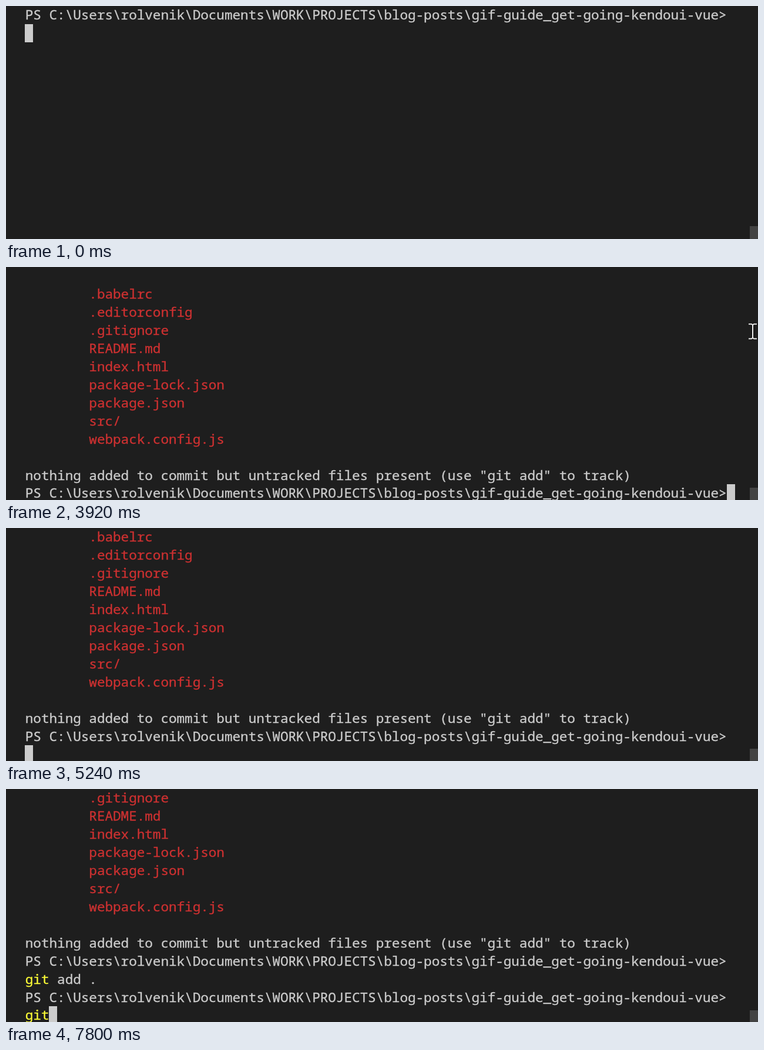
Write an HTML page that moves like this. It is 1280 px wide and 398 px high and loops after 8000 ms.

```html
<!DOCTYPE html>
<html lang="en">
<head>
<meta charset="utf-8">
<title>Terminal session</title>
<style>
  html, body { margin: 0; width: 100%; height: 100%; overflow: hidden; background: #1e1e1e; }
  main { position: fixed; inset: 0; overflow: hidden; contain: strict; }
  pre, #caret, #slider, #mouse { position: absolute; }
  pre {
    left: 32.8px; top: .4px; margin: 0; color: #ccc;
    font: 22.625px/30.92px "Noto Sans Mono", monospace;
    font-variant-ligatures: none;
    -webkit-text-stroke: .35px;
  }
  .cmd { color: #fafa36; }
  .new { color: #cd3131; }
  #caret { width: 13.6px; height: 31px; background: #ccc; }
  #slider { left: 1266px; width: 14px; height: 25px; background: #434343; }
  #mouse { left: 0; top: 0; overflow: visible; }
</style>
</head>
<body>
<main>
  <pre id="text"></pre>
  <div id="caret"></div>
  <div id="slider"></div>
  <svg id="mouse" width="1" height="1" fill="none">
    <path d="M-7-12.5h5l2 1.5 2-1.5h5M0-11v22M-7 12.5h5l2-1.5 2 1.5h5" stroke="#111" stroke-width="4"/>
    <path d="M-7-12.5h5l2 1.5 2-1.5h5M0-11v22M-7 12.5h5l2-1.5 2 1.5h5" stroke="#eee" stroke-width="2"/>
  </svg>
</main>
<script>
const LOOP = 8000, LEFT = 32.4, CELL = 13.575, ROW = 30.92, ROWS = 13;
const $ = id => document.getElementById(id);

const prompt = String.raw`PS C:\Users\rolvenik\Documents\WORK\PROJECTS\blog-posts\gif-guide_get-going-kendoui-vue>`;
const files = ['.babelrc', '.editorconfig', '.gitignore', 'README.md', 'index.html',
  'package-lock.json', 'package.json', 'src/', 'webpack.config.js'];
const lines = [
  prompt, 'git init',
  'Initialized empty Git repository in C:/Users/rolvenik/Documents/WORK/PROJECTS/blog-posts/',
  'gif-guide_get-going-kendoui-vue/.git/',
  prompt, ' git status',
  'On branch master', '', 'No commits yet', '',
  'Untracked files:', '  (use "git add <file>..." to include in what will be committed)', '',
  ...files.map(f => ' '.repeat(8) + f), '',
  'nothing added to commit but untracked files present (use "git add" to track)',
  prompt, 'git add .', prompt, 'git'
];

// Each step places the caret; everything before the caret is on screen.
const steps = [];
const at = (time, line, col, top = Math.max(0, line - ROWS + 1), mouse = null) =>
  steps.push({ time, line, col, top, mouse });
const type = (line, col, ...times) => times.forEach(t => at(t, line, ++col));
const scroll = (time, top, x, y) => at(time, 25, 0, top, x && [x, y]);

at(0, 1, 0);
type(1, 0, 320, 390, 460, 540, 710, 790, 860, 940);
at(1170, 2, 0);
at(1320, 4, prompt.length);
at(1700, 5, 0);
type(5, 0, 1870, 2570, 2650, 2730, 2880, 2960, 3130, 3210, 3360, 3530, 3680);
at(3850, 6, 0);
at(3920, 24, prompt.length, 12, [1271, 110]);
scroll(3990, 13, 1258, 124);
scroll(4080, 13, 1248, 136);
scroll(4220, 11, 1243, 142);
scroll(4300, 9, 1243, 142);
scroll(4380, 7, 1243, 142);
scroll(4460, 5, 1243, 142);
scroll(4690, 6, 1243, 142);
scroll(4770, 8, 1243, 142);
scroll(4860, 9, 1243, 142);
scroll(4930, 10, 1243, 142);
scroll(5010, 11, 1243, 142);
scroll(5090, 12, 1243, 142);
scroll(5170, 13, 1243, 142);
scroll(5240, 13);
type(25, 0, 5390, 5460, 5540, 5610, 5690, 5860, 6010, 6090, 6170);
at(6400, 26, 0);
at(6630, 26, prompt.length);
at(6860, 27, 0);
type(27, 0, 7090, 7570, 7800);

function paint(line) {
  const html = line.replace(/</g, '&lt;');
  if (line.startsWith(' '.repeat(8))) return `<span class="new">${html}</span>`;
  return html.replace(/^ ?g(it?)?(?= |$)/, '<span class="cmd">$&</span>');
}

function show({ line, col, top, mouse }) {
  const shown = [...lines.slice(0, line), lines[line].slice(0, col)];
  $('text').innerHTML = shown.slice(top, top + ROWS).map(paint).join('\n');

  $('caret').style.left = LEFT + col * CELL + 'px';
  $('caret').style.top = (line - top) * ROW + 'px';

  const bottom = Math.max(0, line - ROWS + 1);
  $('slider').style.top = 376 + bottom * .11 - (bottom - top) * 1.4 + 'px';

  $('mouse').style.display = mouse ? '' : 'none';
  if (mouse) $('mouse').style.transform = `translate(${mouse[0]}px, ${mouse[1]}px)`;
}

let current;
function frame() {
  const t = performance.now() % LOOP;
  const step = steps.findLast(s => s.time <= t);
  if (step !== current) show(current = step);
  requestAnimationFrame(frame);
}
frame();
</script>
</body>
</html>
```
